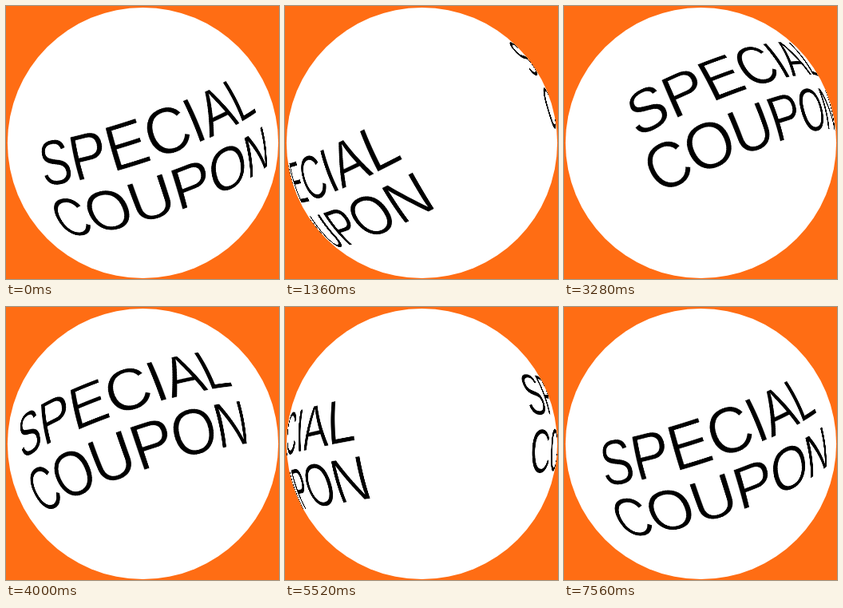
Recreate the animation shown at these times as an HTML page with a canvas. Size 342 by 342 pixels, loop 7600 ms.

```html
<!DOCTYPE html>
<html lang="en">
<head>
<meta charset="utf-8">
<title>Special coupon</title>
<style>
  html, body { margin: 0; width: 100%; height: 100%; overflow: hidden; background: #ff6d14; }
  canvas { position: absolute; left: 0; top: 0; display: block; }
</style>
</head>
<body>
<canvas id="stage" width="342" height="342"></canvas>
<script>
const SIZE = 342, CENTER = 171.5, RADIUS = 169.6;
const LOOP = 7600, STEP = 40;
const DEG = Math.PI / 180;
const ROLL = 19.2 * DEG;    // lean of the spin axis
const TILT = 10.7 * DEG;    // lean of the lettering against the spin axis
const START = -4 * DEG;     // spin at the beginning of the loop
const CAMERA = 10;          // eye distance in sphere radii

// Lettering covering half a turn; it shows twice around the ball.
const LABEL = { ppd: 5, lon: 90, lat: 28, em: 25.2, row: 11.8, thin: 0.011, track: -0.018 };

function makeLabel() {
  const { ppd, lon, lat, em, row, thin, track } = LABEL;
  const c = document.createElement('canvas');
  c.width = 2 * lon * ppd;
  c.height = 2 * lat * ppd;
  const g = c.getContext('2d', { willReadFrequently: true });
  const size = em * ppd;
  g.font = `${size}px "Liberation Sans", Arial, sans-serif`;
  g.letterSpacing = `${track * size}px`;
  g.textAlign = 'center';
  g.lineWidth = thin * size;
  const x = lon * ppd;
  const drop = 0.344 * size;   // half the cap height
  const rows = [['SPECIAL', -row], ['COUPON', row]];
  for (const [text, at] of rows) g.fillText(text, x, (lat + at) * ppd + drop);
  // Shave the outlines to get a lighter weight.
  g.globalCompositeOperation = 'destination-out';
  for (const [text, at] of rows) g.strokeText(text, x, (lat + at) * ppd + drop);
  const rgba = g.getImageData(0, 0, c.width, c.height).data;
  const ink = new Uint8Array(c.width * c.height);
  for (let i = 0; i < ink.length; i++) ink[i] = rgba[4 * i + 3];
  return { ink, w: c.width, h: c.height };
}

// Where each pixel's ray meets the ball, with the roll undone.
function makeHits() {
  const hits = [];
  const k = Math.sqrt(CAMERA * CAMERA - 1);
  const cr = Math.cos(ROLL), sr = Math.sin(ROLL);
  for (let py = 0; py < SIZE; py++) {
    for (let px = 0; px < SIZE; px++) {
      const u = (px + 0.5 - CENTER) / RADIUS;
      const v = (CENTER - py - 0.5) / RADIUS;
      const rr = u * u + v * v;
      if (rr >= 1) continue;
      const s = (CAMERA - Math.sqrt(1 - rr)) / (1 + rr / (k * k));
      const x = u * s / k, y = v * s / k;
      hits.push(py * SIZE + px, x * cr + y * sr, y * cr - x * sr, CAMERA - s);
    }
  }
  return new Float32Array(hits);
}

const ctx = document.getElementById('stage').getContext('2d');
const label = makeLabel();
const hits = makeHits();
const layer = document.createElement('canvas');
layer.width = layer.height = SIZE;
const layerCtx = layer.getContext('2d');
const image = layerCtx.createImageData(SIZE, SIZE);

function sample(x, y) {
  const { ink, w, h } = label;
  const ix = Math.floor(x), iy = Math.floor(y);
  if (ix < 0 || iy < 0 || ix >= w - 1 || iy >= h - 1) return 0;
  const fx = x - ix, fy = y - iy, i = iy * w + ix;
  const top = ink[i] + (ink[i + 1] - ink[i]) * fx;
  const low = ink[i + w] + (ink[i + w + 1] - ink[i + w]) * fx;
  return top + (low - top) * fy;
}

function draw(time) {
  const spin = START + 2 * Math.PI * time / LOOP;
  const cs = Math.cos(spin), ss = Math.sin(spin);
  const ct = Math.cos(TILT), st = Math.sin(TILT);
  const edge = Math.sin(LABEL.lat * DEG);
  const scale = LABEL.ppd / DEG;
  const data = image.data;
  for (let i = 0; i < hits.length; i += 4) {
    const x0 = hits[i + 1], y0 = hits[i + 2], z0 = hits[i + 3];
    const x = x0 * cs + z0 * ss;
    const z = z0 * cs - x0 * ss;
    const up = y0 * ct + z * st;
    let alpha = 0;
    if (Math.abs(up) < edge) {
      const lon = Math.atan(x / (z * ct - y0 * st));
      alpha = sample(label.w / 2 + lon * scale - 0.5, label.h / 2 - Math.asin(up) * scale - 0.5);
    }
    data[4 * hits[i] + 3] = alpha;
  }
  layerCtx.putImageData(image, 0, 0);

  ctx.fillStyle = '#ff6d14';
  ctx.fillRect(0, 0, SIZE, SIZE);
  ctx.fillStyle = '#fff';
  ctx.beginPath();
  ctx.arc(CENTER, CENTER, RADIUS, 0, 2 * Math.PI);
  ctx.fill();
  ctx.drawImage(layer, 0, 0);
}

const start = performance.now();
let shown = -1;
function tick() {
  const t = Math.max(0, performance.now() - start) % LOOP;
  const step = Math.floor(t / STEP);
  if (step !== shown) draw((shown = step) * STEP);
  requestAnimationFrame(tick);
}
tick();
</script>
</body>
</html>
```
